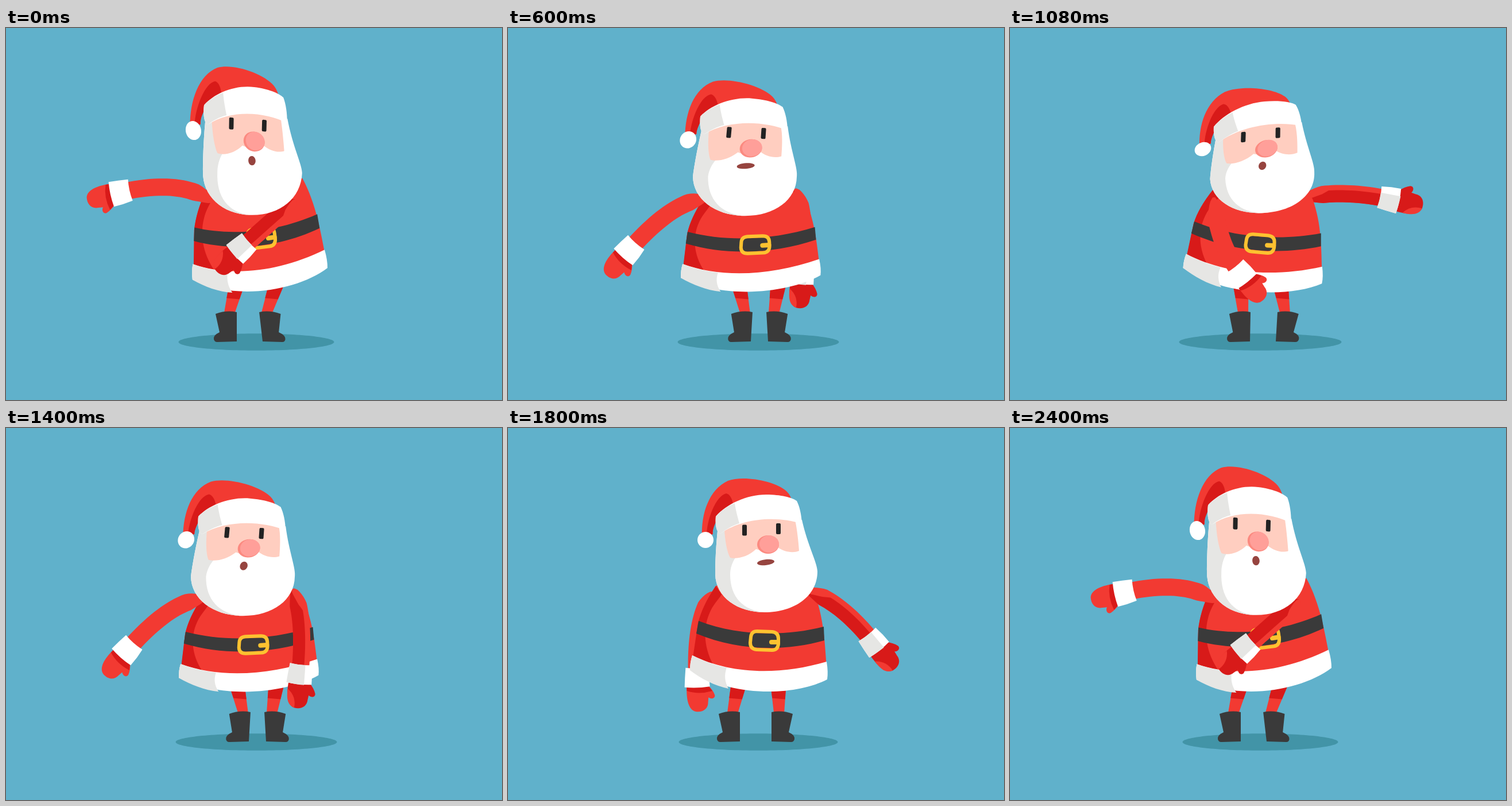
An HTML page with a canvas for the animation above (2440 ms loop, 864 by 648 pixels).

```html
<!DOCTYPE html>
<html lang="en">
<head>
<meta charset="utf-8">
<title>Dancing Santa</title>
<style>
html, body { margin: 0; overflow: hidden; background: #60b1cb; }
canvas { display: block; }
</style>
</head>
<body>
<canvas id="stage" width="864" height="648"></canvas>
<script>
const ctx = document.getElementById("stage").getContext("2d");
const RED = "#f23a32", DARK = "#d81a19", WHITE = "#fff", GREY = "#e6e6e4", BLACK = "#3a3a3a", GOLD = "#fdc230";
const LOOP = 2440, STEP = 40, CYCLE = 800;

// head: x, y, a, b, c, d, jaw shift; body: x, y, a, b, c, d
// feet: heel x and tilt, left then right; arms: shoulder, bend, wrist
const leftOut = {
  head: [421, 168.5, .97, .115, -.05, 1.09, 4],
  body: [444, 366, .975, -.155, .13, 1.03],
  feet: [402, 0, 447, -6], shadow: [135.5],
  left: [360, 303, 308, 262, 200, 286],
  right: [505, 300, 470, 330, 411, 383]
};
const swingRight = {
  head: [441.5, 177, 1, 0, 0, 1, 0],
  body: [446, 371, 1, 0, 0, 1],
  feet: [404, 0, 459, 0], shadow: [138.5],
  left: [360, 286, 325, 325, 329, 434],
  right: [520, 283, 578, 300, 636, 373]
};
const reachRight = {
  head: [437, 186.5, 1.02, -.09, .04, .945, -9.5],
  body: [435, 376, 1.015, .05, -.05, .95],
  feet: [418, 1, 463, 3], shadow: [141.5],
  left: [355, 295, 360, 375, 402, 428],
  right: [510, 296, 575, 280, 660, 298]
};
const swingLeft = {
  head: [415.5, 183, 1.015, .075, -.01, 1, -11],
  body: [430, 378, 1.015, -.08, .04, .92],
  feet: [423, 3, 453, -3], shadow: [140.5],
  left: [346, 298, 290, 298, 212, 386],
  right: [500, 280, 522, 330, 512, 428]
};

function mirror({ head: h, body: b, feet: f, shadow, left, right }, span) {
  const flip = arm => arm.map((v, i) => i % 2 ? v : span - v);
  return {
    head: [857 - h[0], h[1], h[2], .08 - h[3], -h[4], h[5], -11 - h[6]],
    body: [876 - b[0], b[1], b[2], -.08 - b[3], .04 - b[4], b[5]],
    feet: [870 - f[2], -f[3], 870 - f[0], -f[1]], shadow,
    left: flip(right), right: flip(left)
  };
}

const rightOut = mirror(leftOut, 862), reachLeft = mirror(reachRight, 854);
const poses = [leftOut, swingRight, reachRight, rightOut, swingLeft, reachLeft];
const times = [0, 200, 280, 400, 600, 680];
// The arms pass through the opposite swing pose on their way down.
const armPoses = [leftOut, swingLeft, swingRight, reachRight, rightOut, swingRight, swingLeft, reachLeft];
const armTimes = [0, 100, 200, 280, 400, 500, 600, 680];

// Periodic cubic interpolation of one part through its poses
function sample(part, t, keys = poses, at = times) {
  const n = keys.length;
  const value = i => keys[(i + n) % n][part];
  const time = i => at[(i + n) % n] + CYCLE * Math.floor(i / n);
  let i = n - 1;
  while (at[i] > t) i--;
  const span = time(i + 1) - time(i), u = (t - time(i)) / span;
  return value(i).map((p, j) => {
    const slope = k => (value(k + 1)[j] - value(k - 1)[j]) / (time(k + 1) - time(k - 1)) * span;
    const q = value(i + 1)[j], m = slope(i), w = slope(i + 1);
    return p + u * (m + u * (3 * (q - p) - 2 * m - w + u * (2 * (p - q) + m + w)));
  });
}

const clamp = v => Math.max(0, Math.min(1, v));

// Returns a painter that maps each "x,y" of a path through a warp;
// with a jaw, the lower part shifts sideways and tilts less.
function warper([x0, y0, a, b, c, d, jaw], ox, oy) {
  const warp = (_, x, y) => {
    const u = x - ox, v = y - oy, low = jaw === undefined ? 0 : clamp(v / 75);
    return (x0 + a * u + c * v + low * (jaw || 0)) + "," + (y0 + b * u * (1 - .6 * low) + d * v);
  };
  return (color, path, line = 0) => {
    const shape = new Path2D(path.replace(/(-?[\d.]+),(-?[\d.]+)/g, warp));
    paint(color, shape, line);
  };
}

function paint(color, shape, line = 0) {
  if (line) {
    ctx.strokeStyle = color;
    ctx.lineWidth = line;
    ctx.stroke(shape);
  } else {
    ctx.fillStyle = color;
    ctx.fill(shape);
  }
}

const fill = (color, path) => paint(color, new Path2D(path));

function oval(x, y, rx, ry, tilt = 0) {
  const k = .5523;
  const p = (u, v) => (x + u * rx).toFixed(2) + "," + (y + v * ry + tilt * u * rx).toFixed(2) + " ";
  return "M" + p(1, 0) + "C" + p(1, k) + p(k, 1) + p(0, 1) + p(-k, 1) + p(-1, k) + p(-1, 0) +
    p(-1, -k) + p(-k, -1) + p(0, -1) + p(k, -1) + p(1, -k) + p(1, 0) + "Z";
}

function drawLeg(side, heel, tilt) {
  const top = side < 0 ? 402 : 471, ankle = heel + tilt + side * 13;
  const leg = (color, f) => {
    const x = top + (ankle - top) * f, w = 13.5 - 4.5 * f, y = 447 + 51 * f;
    fill(color, `M${top - 13.5},447H${top + 13.5}L${x + w},${y}L${x - w},${y - 2}Z`);
  };
  leg(RED, 1);
  leg(DARK, .5);
  ctx.save();
  ctx.transform(1, 0, -tilt / 52, 1, heel, 546);
  ctx.scale(side, 1);
  fill(BLACK, "M0,-51Q18,-55 37,-48L30,-16Q41,-11 40,-4Q39,1 34,1L0,0Z");
  ctx.restore();
}

function drawArm([sx, sy, qx, qy, wx, wy], shaded) {
  const ribbon = (color, low, high) => {
    const near = [], far = [];
    for (let i = 0; i <= 24; i++) {
      const s = i / 24, r = 1 - s;
      const x = r * r * sx + 2 * r * s * qx + s * s * wx, y = r * r * sy + 2 * r * s * qy + s * s * wy;
      const dx = r * (qx - sx) + s * (wx - qx), dy = r * (qy - sy) + s * (wy - qy), len = Math.hypot(dx, dy);
      const offset = k => [x - dy / len * k, y + dx / len * k].join();
      near.push(offset(low(s)));
      far.unshift(offset(high(s)));
    }
    fill(color, "M" + near.concat(far).join("L") + "Z");
  };
  const half = s => 15 * Math.min(1, Math.sqrt(.02 + 4 * s));
  ribbon(RED, s => -half(s), half);
  if (shaded) ribbon(DARK, s => half(s) - 21 * Math.min(1, 3 * s), half);

  ctx.save();
  ctx.translate(wx, wy);
  ctx.rotate(Math.atan2(wy - qy, wx - qx));
  fill(shaded ? DARK : RED, "M14,18C34,20 56,18 60,4C62,-8 56,-18 44,-18L36,-19C40,-24 38,-31 32,-30C26,-28 20,-24 14,-18Z");
  if (shaded) fill(RED, "M60,4C56,17 44,19 28,18.5Q40,2 60,4Z");
  else fill(DARK, "M14,18L23,18.5Q31,-2 25,-26L14,-18Z");
  fill(WHITE, "M-17,-19Q0,-22 17,-22Q20,0 17,22Q0,21 -17,19Q-14,0 -17,-19Z");
  if (shaded) fill(GREY, "M-16,-8L19,-9Q19,8 17,22Q0,21 -17,19Q-15,6 -16,-8Z");
  ctx.restore();
}

function drawBody(pose) {
  const draw = warper(pose, 446, 371);
  draw(RED, "M362,275C345,300 336,320 331,340L322,404L380,440L500,440L555,416C552,380 551,330 532,283L450,250Z");
  draw(DARK, "M362,275C345,300 336,320 331,340L322,400L362,420C340,385 340,350 350,325C357,307 366,300 372,290Z");
  draw(BLACK, "M332,336C400,362 480,364 550,346L551,370C480,390 400,388 328,358Z");
  draw(GOLD, "M434,354L460,355Q471,356 471,367L471,376Q470,387 460,387L433,386Q422,385 422,374L423,364Q424,354 434,354Z", 6);
  draw(GOLD, "M459,373L470,373", 8);
  draw(WHITE, "M321,396C385,428 470,432 555,407Q558,425 556,438C500,467 390,470 317,422Q317,408 321,396Z");
  draw(GREY, "M321,396C340,406 360,413 381,417.5Q374,436 384,454C360,449 337,437 317,422Q317,408 321,396Z");
}

function drawHead(pose, wide) {
  const draw = warper(pose, 441.5, 177);
  draw(RED, "M338,190C336,150 350,107 383,92C410,82 465,92 485,110C490,115 493,120 495,128L365,160C360,165 356,172 357,185Z");
  draw(DARK, "M346,188C346,160 362,118 380,114C386,115 390,122 392,132L364,160C360,168 357,175 356,185Z");
  draw(WHITE, "M366,170C362,205 361,235 361,255C362,295 400,321 447,321C500,321 539,292 539,250C539,235 522,205 512,160Z");
  draw(GREY, "M366,170C362,205 361,235 361,255C362,295 400,321 447,321C410,318 387,295 387,255C387,245 390,235 396,226L380,170Z");
  draw("#ffcec0", "M377,177L390,155L500,150L501,165C504,180 506,200 507,214C495,219 480,215 470,208C455,214 440,214 432,211C418,224 400,229 387,226C381,215 378,195 377,177Z");
  draw(WHITE, "M362,154C380,133 415,116 450,116C475,116 495,121 503,127C508,137 511,150 512,167C470,153 410,156 370,184C362,182 361,165 362,154Z");
  draw(GREY, "M362,154C373,142 385,135 395,131C397,145 400,155 403,166C390,170 378,178 370,184C362,182 361,165 362,154Z");
  draw(WHITE, oval(344, 195, 14, 14));
  for (const [x, y] of [[412, 178], [471, 175.5]]) {
    const eye = `M${x - 2},${y - 7.5}L${x + 2},${y - 7.5}L${x + 2},${y + 7.5}L${x - 2},${y + 7.5}Z`;
    draw("#222", eye);
    draw("#222", eye, 4);
  }
  draw("#fb8a80", oval(453, 203, 19, 16));
  draw("#ff9f99", oval(455, 202, 17, 15));
  draw("#96443f", oval(449, 234, 6.5 + 8.5 * wide, 7.5 - 2.5 * wide, -.1 * wide));
}

function render(now) {
  // A small lead keeps rounded timestamps on the right step.
  const t = Math.floor((now + 4) / STEP) * STEP % LOOP, phase = t % CYCLE;
  const feet = sample("feet", phase);
  // Two crossings in front, then one behind
  const inFront = crossing => crossing % 3 !== 2;
  const arms = [
    { shape: sample("left", phase, armPoses, armTimes), front: inFront(2 * Math.floor(t / CYCLE) + 1), shaded: false },
    { shape: sample("right", phase, armPoses, armTimes), front: inFront(2 * Math.round(t / CYCLE)), shaded: true }
  ];
  const drawArms = front => arms.forEach(arm => arm.front === front && drawArm(arm.shape, arm.shaded));
  const fromWide = Math.abs((t + 1100) % 1200 - 600);

  ctx.fillStyle = "#60b1cb";
  ctx.fillRect(0, 0, 864, 648);
  fill("#4294a7", oval(436, 547, sample("shadow", phase)[0], 14.8));
  drawArms(false);
  drawLeg(-1, feet[0], feet[1]);
  drawLeg(1, feet[2], feet[3]);
  drawBody(sample("body", phase));
  drawArms(true);
  drawHead(sample("head", phase), clamp((220 - fromWide) / 60));
  requestAnimationFrame(render);
}

ctx.lineCap = ctx.lineJoin = "round";
requestAnimationFrame(render);
</script>
</body>
</html>
```
